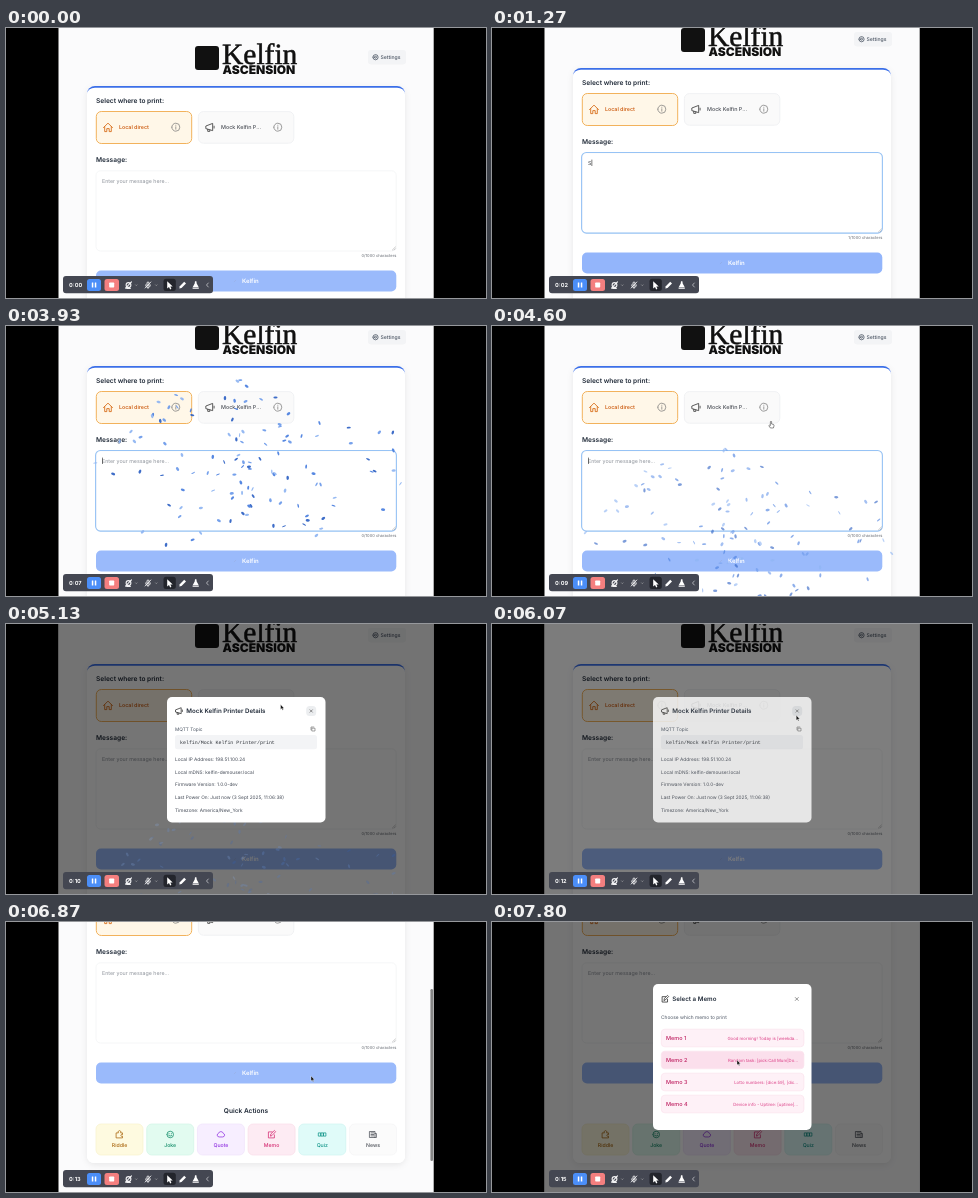
Recreate the animation shown at these times as an HTML page. Size 480 by 270 pixels, loop 8 s.

```html
<!DOCTYPE html>
<html lang="en">
<head>
<meta charset="utf-8">
<title>Kelfin print page</title>
<style>
html, body { margin: 0; width: 100%; height: 100%; overflow: hidden; background: #000; }
svg { display: block; width: 480px; height: 270px; }
text { font-family: Inter, "Noto Sans", sans-serif; white-space: pre; text-rendering: geometricPrecision; }
.serif { font-family: "Liberation Serif", "Noto Serif", serif; }
.mono { font-family: "Liberation Mono", "Noto Sans Mono", monospace; }
</style>
</head>
<body>
<svg id="stage" viewBox="0 0 480 270" xmlns="http://www.w3.org/2000/svg"></svg>
<script>
const LOOP = 8000;
const NOTE = "Shopping list\n\nBananas\nCookies\nKittie snacks";
const LINE = 8.5;

// Markup helpers; text y is the visual middle of the line
const txt = (x, y, s, size, fill, weight = 400, anchor = "start", more = "") =>
  `<text x="${x}" y="${y + size * 0.36}" font-size="${size}" fill="${fill}" font-weight="${weight}" text-anchor="${anchor}" ${more}>${s}</text>`;
const box = (x, y, w, h, r, fill, stroke = "none", sw = 0.8, more = "") =>
  `<rect x="${x}" y="${y}" width="${w}" height="${h}" rx="${r}" fill="${fill}" stroke="${stroke}" stroke-width="${sw}" ${more}/>`;
const icon = (x, y, d, color, sw = 0.8, k = 1) =>
  `<path transform="translate(${x} ${y}) scale(${k})" d="${d}" fill="none" stroke="${color}" stroke-width="${sw}" stroke-linecap="round" stroke-linejoin="round"/>`;
const group = (id, body) => `<g id="${id}">${body}</g>`;
const ring = r => `M${-r} 0A${r} ${r} 0 1 1 ${r} 0A${r} ${r} 0 1 1 ${-r} 0`;

const ICON = {
  house: "M-4.5 0L0-4.5 4.5 0M-3.3-1V4H-1.2V1H1.2V4H3.3V-1",
  horn: "M-4-1.6L2.8-4.2V3.4L-4 1.4ZM-2.4 2V4.2H-.2V2.6M4.3-1.3V.7",
  info: ring(4) + "M0-.4V2M0-2v.1",
  gear: ring(2.6) + ring(1),
  puzzle: "M-3-1.6H-1.1A1.4 1.4 0 1 1 1.1-1.6H3V.1A1 1 0 1 0 3 1.7V3.4H-3Z",
  smile: ring(3.3) + "M-1.2-.9v.2M1.2-.9v.2M-1.6.9Q0 2.5 1.6.9",
  cloud: "M-2.2 2.4A1.8 1.8 0 0 1-2.4-1.1 2.5 2.5 0 0 1 2.4-1.1 1.8 1.8 0 0 1 2.2 2.4Z",
  edit: "M.6-2.6H-3.2V3.4H2.8V.4M-1.1 1.3L-.7-.6 2.8-4 4-2.8.6.8Z",
  cards: "M-3.6-1.6h2v3.2h-2zM-1-1.6h2v3.2h-2zM1.6-1.6h2v3.2h-2z",
  news: "M-3.2-3H2V3H-3.2ZM2-1H3.4V3H2M-2-1.6H.8M-2 0H.8M-2 1.4H.8",
  cross: "M-1.5-1.5L1.5 1.5M1.5-1.5L-1.5 1.5",
  copy: "M-.8-.8H2V2H-.8ZM-2 .8V-2H.8",
  down: "M-.7-.4L0 .3 .7-.4"
};

const actions = [
  ["Riddle", "puzzle", "#fefae0", "#f8f2cc", "#a9650c"],
  ["Joke", "smile", "#e2fbf0", "#d2f4e5", "#0d8a66"],
  ["Quote", "cloud", "#f7eeff", "#efe2fb", "#8f2fe0"],
  ["Memo", "edit", "#fdebf3", "#f9dde9", "#d42a70"],
  ["Quiz", "cards", "#e0fbf9", "#cff4f1", "#0f9488"],
  ["News", "news", "#fbfbfb", "#f4f4f5", "#4b4f57"]
];

const quick = actions.map(([name, pic, bg, edge, ink], i) => {
  const x = 90 + i * 50.7;
  return box(x, 304, 47, 31, 5, bg, edge, 0.7) + icon(x + 23.5, 314.5, ICON[pic], ink, 0.75) +
    txt(x + 23.5, 325.3, name, 5.2, ink, 500, "middle");
}).join("");

const page =
  box(189, 18, 24, 24, 3, "#111") +
  txt(216, 25, "Kelfin", 29.5, "#111", 400, "start", 'class="serif" stroke="#111" stroke-width=".5"') +
  txt(216.5, 41.6, "ASCENSION", 12, "#111", 900) +
  box(362, 22, 38, 14.5, 3, "#f3f4f6") + icon(369.5, 29.2, ICON.gear, "#4b5563", 0.8) +
  txt(374.5, 29.2, "Settings", 5.1, "#4b5563", 500) +
  box(81, 58, 318, 285, 8, "#fff", "none", 0, 'filter="url(#soft)"') +
  box(81, 58, 318, 24, 8, "#3b6fe8") +
  box(81, 59.7, 318, 283.3, 8, "#fff", "none", 0, 'ry="6.3"') +
  txt(90, 72.3, "Select where to print:", 6.6, "#1f2937", 600) +
  box(90.3, 83.5, 95.4, 32, 5, "#fff7e8", "#f2b25c", 1) +
  icon(102, 99.6, ICON.house, "#d9701c", 0.9) +
  txt(113, 99.4, "Local direct", 5.3, "#cf641c", 600) + icon(169.8, 99.2, ICON.info, "#757575", 0.7) +
  box(192.4, 83.6, 95.4, 31.6, 5, "#fafafa", "#eeeff1", 0.8) +
  icon(204, 99.4, ICON.horn, "#4b4b4b", 0.95, 0.95) +
  txt(215, 99.4, "Mock Kelfin P...", 5.4, "#4b4f57", 500) + icon(271.8, 99.2, ICON.info, "#757575", 0.7) +
  txt(90, 132, "Message:", 6.6, "#1f2937", 600) +
  box(90, 142.8, 300.2, 80.2, 4.5, "#fff", "#f3f4f5", 0.8) +
  box(89.6, 142.5, 300.8, 80.6, 4.8, "none", "#97c3f5", 1.1, 'id="focus"') +
  icon(388, 220.6, "M-1.6 1.4L1.4-1.6M.2 1.4L1.4.2", "#777", 0.4) +
  group("hint", txt(96, 152.8, "Enter your message here...", 5.3, "#8e939b")) +
  group("note", "") +
  box(96, 149.6, 0.6, 6.4, 0, "#222", "none", 0, 'id="caret"') +
  txt(390.3, 228, "", 4.05, "#666b73", 400, "end", 'id="count"') +
  group("send", box(90, 242.5, 300.3, 21, 5, "#1b64f8") +
    icon(229, 253, "M-.8.8L.8-.8", "#174fc4", 0.7) + txt(244.3, 253, "Kelfin", 6, "#fff", 600, "middle")) +
  txt(240, 291, "Quick Actions", 6.6, "#1f2937", 600, "middle") + quick;

const facts = [
  "Local IP Address: 198.51.100.24",
  "Local mDNS: kelfin-demouser.local",
  "Firmware Version: 1.0.0-dev",
  "Last Power On: Just now (3 Sept 2025, 11:06:38)",
  "Timezone: America/New_York"
];
const details = box(161, 73, 158.5, 125.5, 5, "#fff") +
  icon(173, 87, ICON.horn, "#333", 1, 0.78) +
  txt(180.3, 87, "Mock Kelfin Printer Details", 6.2, "#1f2937", 600) +
  box(300.2, 82, 10, 10, 3.5, "#eceef0") + icon(305.2, 87, ICON.cross, "#444", 0.7, 0.8) +
  txt(169, 105.2, "MQTT Topic", 4.75, "#4b5563") + icon(307, 105, ICON.copy, "#666", 0.6) +
  box(169, 111, 142, 14.3, 2.5, "#f3f4f6") +
  txt(174, 118.2, "kelfin/Mock Kelfin Printer/print", 4.95, "#2b2f36", 400, "start", 'class="mono"') +
  facts.map((s, i) => txt(169, 135.2 + i * 12.75, s, 4.75, "#414854")).join("");

const memos = [
  "Good morning! Today is [weekda...",
  "Random task: [pick:Call Mum|Do...",
  "Lotto numbers: [dice:59], [dic...",
  "Device info - Uptime: [uptime]..."
];
const ROW = "#fef1f7", ROW_ON = "#fbdfec";
const picker = box(161, 62, 158.5, 146, 5, "#fff") +
  icon(173, 77, ICON.edit, "#333", 0.9, 0.9) + txt(180.3, 77, "Select a Memo", 6.2, "#1f2937", 600) +
  icon(304.8, 77, ICON.cross, "#666", 0.7) +
  txt(169, 95.6, "Choose which memo to print", 4.85, "#4b5563") +
  memos.map((s, i) => {
    const y = 116 + i * 22;
    return box(169.3, y - 8.8, 142.6, 17.6, 3.5, ROW, "#fbe2ed", 0.7, 'class="row"') +
      txt(174, y, `Memo ${i + 1}`, 5.5, "#be1f60", 500) + txt(306, y, s, 4.3, "#dc3f86", 400, "end");
  }).join("");

const bar = box(57, 248, 150, 17.3, 3, "#444752") +
  txt(63, 257, "0:00", 5.6, "#fff", 700, "start", 'id="clock"') +
  box(81, 251, 14, 12, 2.5, "#4b8ef8") + box(85.8, 254.4, 1.5, 5.2, 0.3, "#fff") + box(88.8, 254.4, 1.5, 5.2, 0.3, "#fff") +
  box(98.5, 251, 14.5, 12, 2.5, "#f47f7f") + box(103.2, 254.5, 5, 5, 0.7, "#fff") +
  icon(122.5, 257, ring(2.4) + "M-3 3.2L3-3.2M-1.8 3.4H1.8", "#f2f2f4", 1.1) +
  icon(130.3, 257.3, ICON.down, "#bbb", 0.6) +
  icon(142, 257, "M-1-.2V-2A1 1 0 0 1 1-2V0A1 1 0 0 1-1 0M-2.4 0A2.4 2.4 0 0 0 2.4 0M0 2.4V3.4M-2.8 3L2.8-3", "#f2f2f4", 0.9) +
  icon(150.3, 257.3, ICON.down, "#bbb", 0.6) +
  box(157.5, 250.8, 12.3, 12.3, 2.5, "#23252c") +
  '<path d="M161.2 253.2V260.6L163 259 164.2 261.4 165.4 260.8 164.3 258.5H166.7Z" fill="#fff"/>' +
  '<path d="M173.3 260.4L173.8 258.2 178.2 253.7 180 255.4 175.5 259.9Z" fill="#fff"/>' +
  '<path d="M189 253.3H190.4L190.7 255.6 192.6 259H186.8L188.7 255.6Z M186.6 259.6H192.8V260.8H186.6Z" fill="#fff"/>' +
  icon(201.5, 257, "M.8-2L-1 0 .8 2", "#c6c7cc", 0.8);

const pointer = '<path id="arrow" d="M0 0V5L1.2 4 2 5.7 2.8 5.3 2 3.7H3.5Z" fill="#111" stroke="#fff" stroke-width=".35"/>' +
  '<path id="hand" d="M-.6-.4Q0-1.4.6-.4V2L2.6 2.5Q3.2 2.8 3 4L2.4 6H-.6L-2.2 3.6Q-1.8 2.7-.6 3.6Z" fill="#fff" stroke="#333" stroke-width=".55"/>';

const stage = document.getElementById("stage");
stage.innerHTML = `<defs>
  <clipPath id="screen"><rect x="52.5" width="375.2" height="270"/></clipPath>
  <filter id="soft" x="-10%" y="-10%" width="120%" height="120%"><feDropShadow dx="0" dy="2" stdDeviation="3" flood-opacity=".08"/></filter>
</defs><g clip-path="url(#screen)">` +
  box(52, 0, 376, 270, 0, "#fbfbfc") + group("page", page) +
  box(424.4, 2, 2.6, 172, 1.3, "#858585", "none", 0, 'id="thumb"') +
  box(52, 0, 376, 270, 0, "#000", "none", 0, 'id="shade"') + group("confetti", "") +
  group("details", details) + group("picker", picker) +
  group("cursor", pointer) + bar + "</g>";

const el = {};
stage.querySelectorAll("[id]").forEach(n => el[n.id] = n);
const rows = [...stage.querySelectorAll(".row")];
const show = (n, on) => n.setAttribute("visibility", on ? "visible" : "hidden");
const fade = (n, v) => { n.setAttribute("opacity", v); show(n, v > 0.002); };

// Eased value from a table of [time, value, ...]
function track(t, keys, k = 1) {
  if (t <= keys[0][0]) return keys[0][k];
  for (let i = 1; i < keys.length; i++) {
    const a = keys[i - 1], b = keys[i];
    if (t < b[0]) {
      const p = (t - a[0]) / (b[0] - a[0]);
      return a[k] + (b[k] - a[k]) * p * p * (3 - 2 * p);
    }
  }
  return keys[keys.length - 1][k];
}

const DIM = 0.54;
const SCROLL = [[40, 0], [870, 18], [6290, 18], [6840, 102]];
const SEND = [[1250, 0.44], [1400, 1], [3180, 1], [3330, 0.44]];
const SHADE = [[4900, 0], [5080, DIM], [6040, DIM], [6240, 0], [7310, 0], [7480, DIM]];
const DETAILS = [[4900, 0], [5060, 1], [6040, 1], [6150, 0]];
const PICKER = [[7310, 0], [7460, 1]];
const MOUSE = [[4070, 302, 178], [4600, 279, 96], [4800, 273, 83], [4930, 273, 81], [5130, 274.6, 80.5],
  [5480, 305, 87], [6050, 305, 87], [6190, 292.5, 157.5], [6400, 293, 158], [6870, 305, 154],
  [7200, 265, 217], [7310, 265, 217], [7720, 245, 138]];
const TYPING = [[1270, 1530, 0, 13], [1730, 2070, 13, 31], [2270, 3000, 31, 44]];

function typed(t) {
  if (t >= 3200) return "";
  let n = 0;
  for (const [a, b, from, to] of TYPING)
    if (t >= a) n = Math.min(to, from + 1 + Math.floor((to - from) * (t - a) / (b - a)));
  return NOTE.slice(0, n);
}

// Confetti: fast burst with drag, then a steady fall
let seed = 11;
const rnd = () => (seed = (seed * 16807) % 2147483647) / 2147483647;
const blues = ["#2f62c4", "#4a7fdf", "#6c9aea", "#8fb5f2"];
const bits = Array.from({ length: 120 }, (_, i) => {
  const node = document.createElementNS("http://www.w3.org/2000/svg", "ellipse");
  node.setAttribute("fill", blues[i % blues.length]);
  node.setAttribute("rx", 2.1);
  el.confetti.append(node);
  return {
    node, angle: (rnd() + rnd() - 1) * 1.15, reach: 95 + rnd() * 145,
    turn: rnd() * 360, spin: 1 + rnd() * 3, wob: rnd() * 6, rate: 0.05 + rnd() * 0.06
  };
});

function drawConfetti(t) {
  const p = (t - 3400) / 1950, on = p > 0 && p < 1;
  show(el.confetti, on);
  if (!on) return;
  const tick = p * 200, out = 1 - Math.pow(0.9, tick);
  el.confetti.setAttribute("opacity", 1 - p * p);
  for (const b of bits) {
    const wave = b.wob + tick * b.rate;
    const x = 244 + Math.sin(b.angle) * b.reach * out + Math.cos(wave) * 2.5;
    const y = 236 - Math.cos(b.angle) * b.reach * out + tick * 1.02;
    b.node.setAttribute("transform", `translate(${x} ${y}) rotate(${b.turn + tick * b.spin})`);
    b.node.setAttribute("ry", 0.5 + 0.8 * Math.abs(Math.sin(wave)));
  }
}

let last = null;
function drawNote(s) {
  if (s === last) return;
  last = s;
  const lines = s.split("\n");
  el.note.innerHTML = lines.map((l, i) => txt(96, 152.8 + i * LINE, l, 5.3, "#30343b")).join("");
  el.count.textContent = `${s.length}/1000 characters`;
  show(el.hint, !s);
  const end = el.note.lastChild;
  el.caret.setAttribute("x", 96 + (lines[lines.length - 1] ? end.getComputedTextLength() + 0.2 : 0));
  el.caret.setAttribute("y", 149.6 + (lines.length - 1) * LINE);
}

function draw(t) {
  const scroll = track(t, SCROLL);
  el.page.setAttribute("transform", `translate(0 ${-scroll})`);
  el.thumb.setAttribute("y", 2 + scroll * 0.637);
  show(el.thumb, (t >= 70 && t < 925) || (t >= 6290 && t < 6990));

  drawNote(typed(t));
  const focused = t >= 800 && t < 4900;
  show(el.focus, focused);
  show(el.caret, focused);
  fade(el.send, track(t, SEND));
  fade(el.shade, track(t, SHADE));
  fade(el.details, track(t, DETAILS));
  fade(el.picker, track(t, PICKER));
  drawConfetti(t);

  const x = track(t, MOUSE), y = track(t, MOUSE, 2);
  const hand = (t > 4560 && t < 4930) || (t > 7080 && t < 7330);
  show(el.arrow, t >= 4070 && !hand);
  show(el.hand, hand);
  el.cursor.setAttribute("transform", `translate(${x} ${y})`);
  rows.forEach((r, i) => r.setAttribute("fill", Math.abs(y - 116 - i * 22) < 8.8 ? ROW_ON : ROW));

  const sec = Math.max(0, Math.floor((t - 20) / 500));
  el.clock.textContent = `0:${String(sec).padStart(2, "0")}`;
}

const start = performance.now();
function loop() {
  draw((performance.now() - start) % LOOP);
  requestAnimationFrame(loop);
}
draw(0);
requestAnimationFrame(loop);
</script>
</body>
</html>
```
